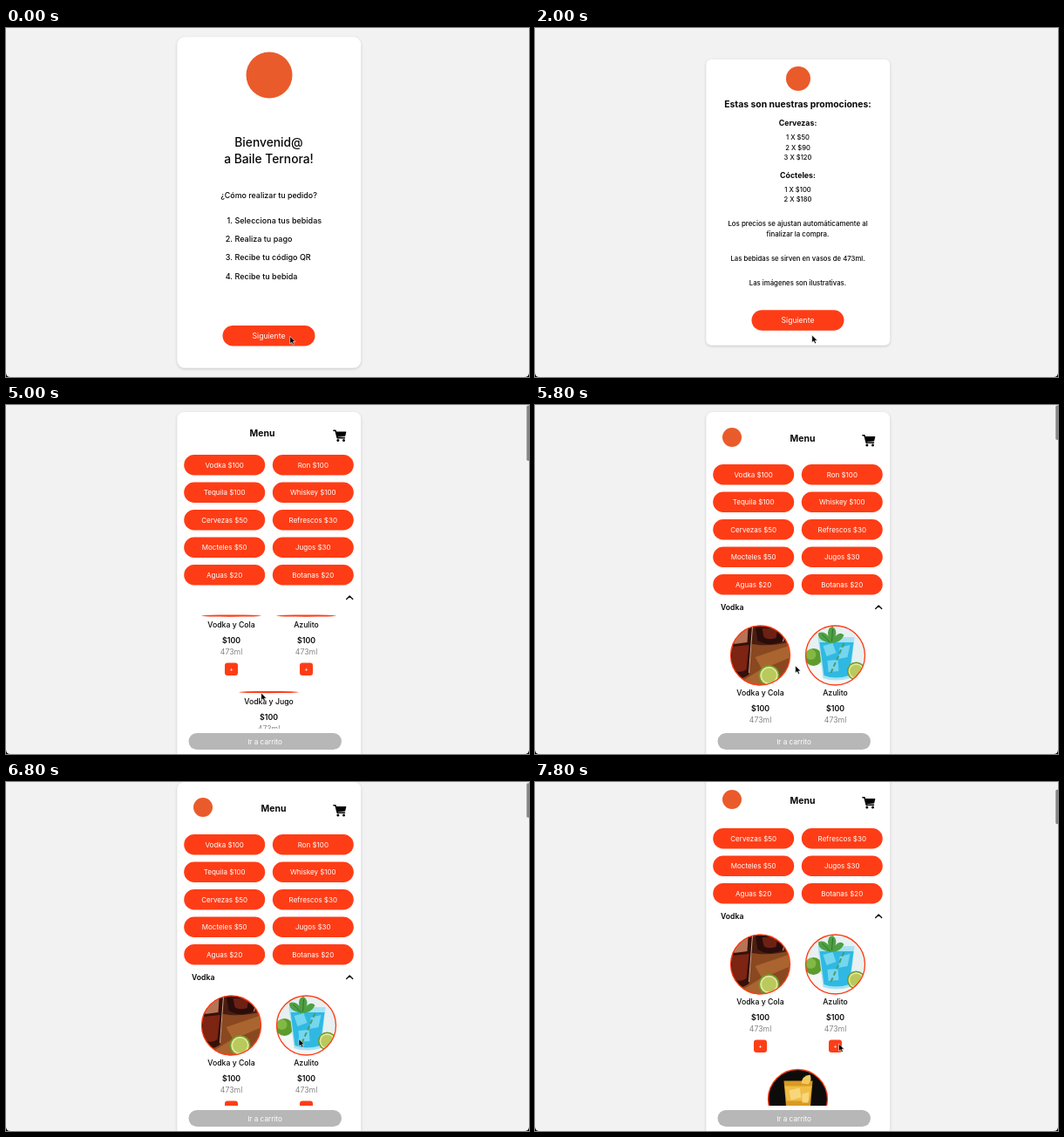
An HTML page that plays this animation: 600x400 px, repeating every 8 s.

```html
<!DOCTYPE html>
<html lang="es">
<head>
<meta charset="utf-8">
<title>Pedido de bebidas</title>
<style>
html, body { margin: 0; width: 100%; height: 100%; overflow: hidden; background: #000; }
svg { display: block; width: 100vw; height: 100vh; }
text { font-family: Inter, "Open Sans", sans-serif; }
.card { fill: #fff; filter: drop-shadow(0 1px 1.5px rgba(0, 0, 0, .18)); }
</style>
</head>
<body>
<svg id="stage" viewBox="0 0 600 400"></svg>
<script>
const LOOP = 8000, STEP = 200;
const RED = '#fe3d16', INK = '#080808', LOGO = '#ea5b2b';
const STICK = 17;

// Text placed by the middle of its capitals
function label(str, x, y, size, { weight = 500, fill = INK, anchor = 'middle' } = {}) {
  return `<text x="${x}" y="${(y + size * 0.36).toFixed(2)}" font-size="${size}" font-weight="${weight}" fill="${fill}" text-anchor="${anchor}">${str}</text>`;
}

const rect = (x, y, w, h, r, fill) =>
  `<rect x="${x}" y="${y}" width="${w}" height="${h}" rx="${r}" fill="${fill}"/>`;
const circle = (x, y, r, fill) => `<circle cx="${x}" cy="${y}" r="${r}" fill="${fill}"/>`;
const path = (d, fill, extra = '') => `<path d="${d}" fill="${fill}" ${extra}/>`;
const card = (y, h, r) => `<rect class="card" x="196.3" y="${y}" width="211" height="${h}" rx="${r}"/>`;
const group = (id, body) => `<g id="${id}">${body}</g>`;

function pill(str, x, y, w, size) {
  return rect(x, y - 11.7, w, 23.4, 11.7, RED) + label(str, x + w / 2, y, size, { weight: 400, fill: '#fff' });
}

function welcome() {
  const steps = ['Selecciona tus bebidas', 'Realiza tu pago', 'Recibe tu código QR', 'Recibe tu bebida'];
  return card(10.2, 379.6, 9) + circle(302, 54, 26.5, LOGO) +
    label('Bienvenid@', 301.5, 131.3, 13.8) +
    label('a Baile Ternora!', 301.5, 150.3, 13.8) +
    label('¿Cómo realizar tu pedido?', 301.5, 191.3, 8.9) +
    steps.map((s, i) => {
      const y = 220.8 + i * 21.2;
      return label(`${i + 1}.`, 260, y, 9, { anchor: 'end' }) + label(s, 262.5, y, 9, { anchor: 'start' });
    }).join('') +
    pill('Siguiente', 248.5, 352.8, 106, 8.6);
}

function promos() {
  const mid = 301.5, bold = { weight: 700 };
  const column = (rows, y, size, gap) =>
    rows.map((s, i) => label(s, mid, y + i * gap, size)).join('');
  return card(36, 327.8, 6) + circle(302, 58, 14, LOGO) +
    label('Estas son nuestras promociones:', mid, 87, 10.4, bold) +
    label('Cervezas:', mid, 109, 8.8, bold) +
    column(['1 X $50', '2 X $90', '3 X $120'], 125.5, 7.6, 11.5) +
    label('Cócteles:', mid, 168.5, 8.8, bold) +
    column(['1 X $100', '2 X $180'], 185, 7.6, 11.5) +
    column(['Los precios se ajustan automáticamente al', 'finalizar la compra.'], 224.5, 7.9, 11.5) +
    column(['Las bebidas se sirven en vasos de 473ml.', 'Las imágenes son ilustrativas.'], 264.5, 7.75, 28) +
    pill('Siguiente', 248.5, 335, 106, 8.6);
}

const lime = (x, y, r) =>
  circle(x, y, r, '#6f9a25') + circle(x, y, r * 0.86, '#e3e6a4') + circle(x, y, r * 0.7, '#b9c95c');

// Drink pictures, drawn around their own centre
const pictures = {
  cola: rect(-35, -35, 70, 70, 0, '#8a4820') +
    path('M-35-35H35V-16Q0-6-35-20Z', '#4a1d10') +
    path('M-6 2L35-12V2L2 16ZM-30 35L4 14 12 35Z', '#a9642f') +
    path('M-35-35H-8L-13 22Q-24 30-35 24Z', '#35100a') +
    path('M-33-10L-13-12-16 16Q-24 22-32 16Z', '#7d2412') +
    path('M-31-28L-14-31-15-15-30-13Z', '#b77355') +
    path('M-6-35H30L26-16Q10-9-3-17Z', '#2a0d0a') +
    path('M2-31H20L18-20Q9-17 4-21Z', '#6d2114') +
    path('M-9-33L-13 20M30-34L26-16', 'none', 'stroke="#d5a68d" stroke-width="1"') +
    lime(10, 23, 12),
  azul: rect(-35, -35, 70, 70, 0, '#e8f0f2') +
    path('M-35 14Q0 6 35 16V35H-35Z', '#f4f7f6') +
    circle(-25, 2, 10, '#5d9b2c') + circle(-28, -1, 6, '#82b844') +
    path('M-20-21H22L17 26Q0 31-14 26Z', '#a8e2f2') +
    path('M-18-15H21L16 23Q0 28-13 23Z', '#2fb9e2') +
    path('M-14-11L-3-14 1-3-10 1ZM5-9L17-12 14 2 4 4ZM-9 6L3 5 4 18-8 19Z', '#74d6ef') +
    path('M-5 20L10-14', 'none', 'stroke="#4b9c6a" stroke-width="2" stroke-dasharray="5 3"') +
    path('M-6-14Q-22-18-19-26-12-28-8-22-10-32-3-33 3-28 0-22 6-28 10-23 6-14-6-14Z', '#4fa044') +
    path('M-6-15L-15-24M-4-16L-3-30', 'none', 'stroke="#2d7432" stroke-width="1"') +
    lime(24, 18, 10.5),
  jugo: rect(-35, -35, 70, 70, 0, '#0d0c0b') +
    path('M-16-21H17L13 25Q0 29-12 25Z', '#d99a22') +
    path('M-15-15H16L13 2H-13Z', '#f0bd45') +
    path('M-10-10L2-13 4-2-8 1ZM5-6L13-8 12 4 5 4Z', '#f7d77c') +
    path('M4-18Q5-27 14-28 17-22 12-17Z', '#f2c95a')
};

function product(pic, name, x, y, loaded) {
  const ring = loaded
    ? `<g transform="translate(${x} ${y})"><g clip-path="url(#round)">${pictures[pic]}</g>` +
      `<circle r="34" fill="none" stroke="${RED}" stroke-width="1.3"/></g>`
    : `<ellipse cx="${x}" cy="${y + 32.6}" rx="34.5" ry="1.1" fill="${RED}"/>`;
  return ring + label(name, x, y + 43, 8.7) +
    label('$100', x, y + 61, 8.8, { weight: 600 }) +
    label('473ml', x, y + 74.3, 8.7, { weight: 400, fill: '#858585' }) +
    rect(x - 7.5, y + 86.5, 15, 14.6, 3, RED) +
    label('+', x, y + 93.8, 7, { weight: 400, fill: '#fff' });
}

function cart(x, y) {
  return `<g transform="translate(${x} ${y})">` +
    path('M.6.8H2.7L4.9 9.2H13.2', 'none', 'stroke="#000" stroke-width="1.5" stroke-linecap="round" stroke-linejoin="round"') +
    path('M3 1.9H14.6Q15.2 2 15 2.7L13.8 7.4 4.6 8.2Z', '#000') +
    circle(5.6, 12, 1.5, '#000') + circle(12.2, 12, 1.5, '#000') + '</g>';
}

// Without its pictures the page sits higher and is shorter
function menu(loaded) {
  const lift = loaded ? 0 : 11, pull = loaded ? 0 : 78, head = loaded ? 0 : 5.5;
  const kinds = ['Vodka $100', 'Ron $100', 'Tequila $100', 'Whiskey $100', 'Cervezas $50',
    'Refrescos $30', 'Mocteles $50', 'Jugos $30', 'Aguas $20', 'Botanas $20'];
  const row = 287 - pull;
  const list = card(8, 900, 8) +
    kinds.map((s, i) => pill(s, i % 2 ? 305.8 : 204.2, 79.7 - lift + (i >> 1) * 31.5, 93, 8)).join('') +
    (loaded ? label('Vodka', 213, 232, 8.7, { weight: 600, anchor: 'start' }) : '') +
    path(`M390.7 ${233.5 - lift}l3.5-3.6 3.5 3.6`, 'none', 'stroke="#111" stroke-width="1.4" stroke-linecap="round" stroke-linejoin="round"') +
    product('cola', 'Vodka y Cola', 258.5, row, loaded) +
    product('azul', 'Azulito', 344.5, row, loaded) +
    product('jugo', 'Vodka y Jugo', 301.5, row + (loaded ? 154.5 : 87.5), loaded);
  const bar = rect(197, STICK, 209.5, 48 - lift, 0, '#fff') +
    (loaded ? circle(226, 37, 11, LOGO) : '') +
    label('Menu', loaded ? 307 : 294, 38 - head, 10.4, { weight: 700 }) +
    cart(375.3, 34 - head);
  const id = loaded ? 'full' : 'bare';
  return group(id + 'List', list) + group(id + 'Head', bar) +
    rect(197, 371, 209.5, 29, 0, '#fff') + rect(209.5, 376, 175.5, 19, 9.5, '#b7b7b7') +
    label('Ir a carrito', 297, 385.7, 8.2, { weight: 400, fill: '#fff' }) +
    `<rect id="${id}Thumb" x="597.3" y="0.5" width="3.5" height="${loaded ? 39.5 : 63.5}" rx="1.7" fill="#858585"/>`;
}

const stage = document.getElementById('stage');
stage.innerHTML =
  `<defs><clipPath id="round"><circle r="34"/></clipPath>
   <clipPath id="window"><path d="M0 0H600V395Q600 400 595 400H5Q0 400 0 395Z"/></clipPath></defs>
   <g clip-path="url(#window)">` + rect(0, 0, 600, 400, 0, '#f2f2f2') +
  group('welcome', welcome()) + group('promos', promos()) +
  group('bare', menu(false)) + group('full', menu(true)) + '</g>' +
  group('arrow', path('M0 0V8.6L2 6.8 3.4 9.8 4.9 9.1 3.6 6.2H6.3Z', '#000', 'stroke="#fff" stroke-width=".6"')) +
  group('hand', path('M-1 .8Q-.9-.2 0-.2T1 .8V3.6L4.4 4.4Q5.4 4.8 5.2 5.9L4.5 9.4H-.4L-3.2 5.8Q-3.1 4.4-2 4.9L-1 5.7Z', '#fff', 'stroke="#111" stroke-width=".9" stroke-linejoin="round"'));

const el = id => document.getElementById(id);
const show = (id, on) => el(id).setAttribute('display', on ? 'inline' : 'none');
const move = (id, x, y) => el(id).setAttribute('transform', `translate(${x} ${y})`);

// Keys are [time, ...values], joined by straight lines
function track(keys, t) {
  const i = keys.findIndex(k => k[0] > t);
  if (i < 0) return keys[keys.length - 1].slice(1);
  if (i === 0) return keys[0].slice(1);
  const a = keys[i - 1], b = keys[i], p = (t - a[0]) / (b[0] - a[0]);
  return a.slice(1).map((v, n) => v + (b[n + 1] - v) * p);
}

const pages = [['welcome', 0, 1600], ['promos', 1600, 5000], ['bare', 5000, 5200], ['full', 5200, LOOP]];
const pointer = [[0, 325.7, 353.3], [1400, 325.7, 353.3], [2000, 317.7, 352], [2600, 317.7, 352],
  [3400, 292, 331], [4800, 292, 331], [5000, 292.7, 330], [5800, 298.7, 298.7],
  [6800, 336, 294.5], [7400, 348.5, 300]];
const scroll = [[6600, 0], [6800, 8], [7000, 45], [7200, 70], [7400, 76], [7600, 78]];

function draw(ms) {
  const t = Math.floor((ms % LOOP) / STEP) * STEP;
  for (const [id, from, to] of pages) show(id, t >= from && t < to);

  const [s] = track(scroll, t);
  move('fullList', 0, -s);
  move('fullHead', 0, -Math.min(s, STICK));
  move('fullThumb', 0, s * 0.105);

  const [x, y] = track(pointer, t);
  const over = t >= 3200 && t < 5000;
  show('hand', over);
  show('arrow', !over);
  move(over ? 'hand' : 'arrow', x, y);
}

const start = performance.now();
function tick() {
  draw(performance.now() - start);
  requestAnimationFrame(tick);
}
tick();
</script>
</body>
</html>
```
